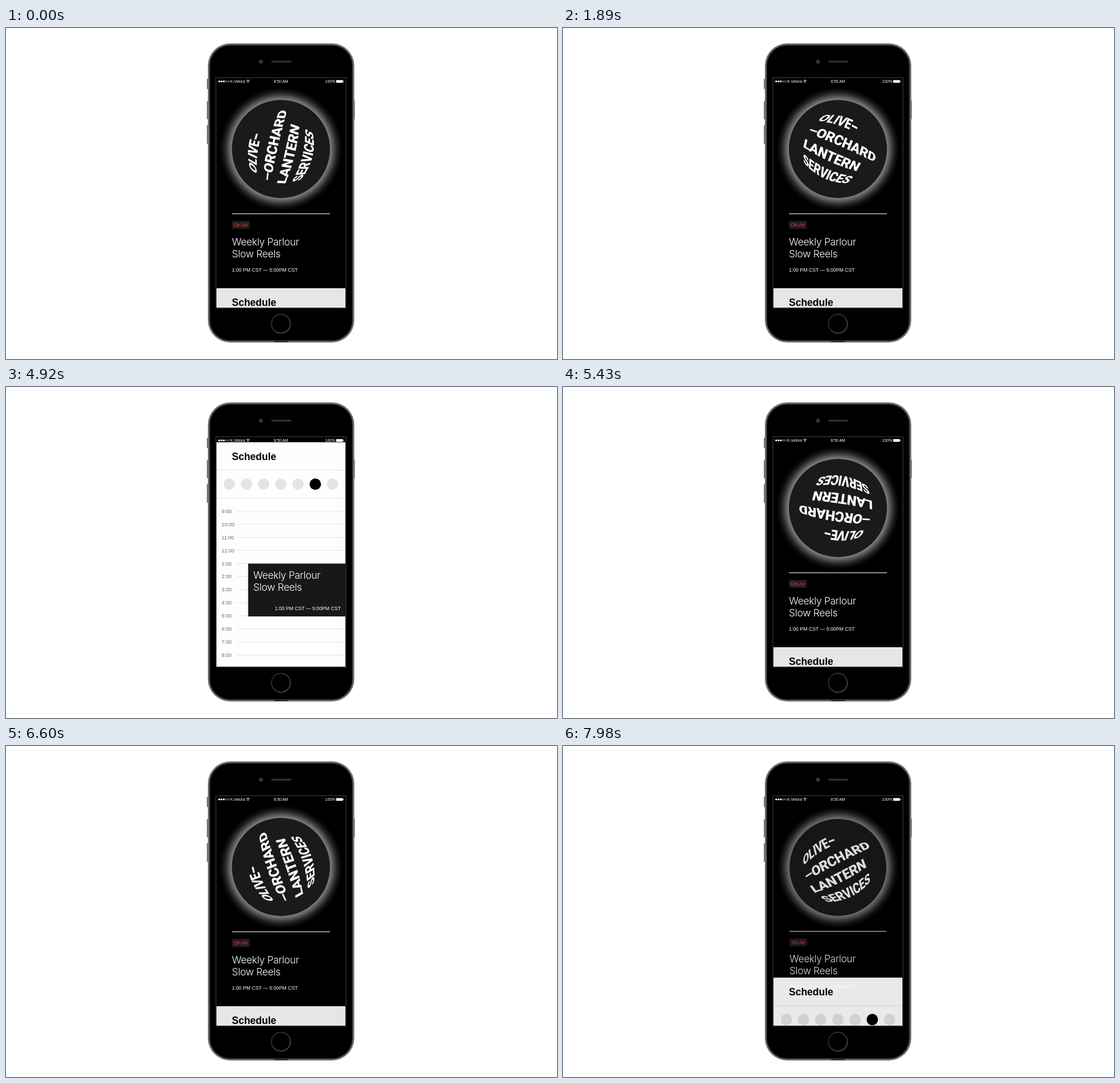
These frames come from a looping animation (966 px wide and 580 px high, 8 s). An HTML page:

```html
<!DOCTYPE html>
<html lang="en">
<head>
<meta charset="utf-8">
<title>Radio schedule on a phone</title>
<style>
  html, body { margin: 0; width: 100%; height: 100%; overflow: hidden; background: #fff; }
  svg { display: block; width: 100vw; height: 100vh; }
  text { font-family: "Liberation Sans", Arial, sans-serif; fill: #fff; }
  .status { font-size: 6.8px; }
  .title { font: 300 17.5px Inter, Roboto, sans-serif; letter-spacing: -.35px; }
  .when { font-size: 8.72px; }
  .air { font-size: 8.8px; fill: #ff412b; }
  .head { font-size: 17.5px; font-weight: bold; fill: #000; }
  .hour { font-size: 9px; fill: #6a6a6a; }
  .globe { font: 800 25px Roboto, "Liberation Sans", sans-serif; text-anchor: middle; }
</style>
</head>
<body>
<svg viewBox="0 0 966 580">
  <defs>
    <linearGradient id="ring" x1="0" x2="1" y1="0" y2="1">
      <stop offset="0" stop-color="#2a2a2a"/>
      <stop offset=".5" stop-color="#3c3c3c"/>
      <stop offset="1" stop-color="#555"/>
    </linearGradient>
    <radialGradient id="glow">
      <stop offset=".79" stop-color="#fff" stop-opacity=".52"/>
      <stop offset=".84" stop-color="#fff" stop-opacity=".37"/>
      <stop offset=".9" stop-color="#fff" stop-opacity=".17"/>
      <stop offset=".95" stop-color="#fff" stop-opacity=".06"/>
      <stop offset="1" stop-color="#fff" stop-opacity="0"/>
    </radialGradient>
    <clipPath id="glass"><rect x="369" y="88" width="226" height="402"/></clipPath>
  </defs>

  <!-- phone body -->
  <g fill="#7c7e85">
    <rect x="352" y="89" width="3" height="18" rx="1"/>
    <rect x="352" y="128" width="3" height="32" rx="1"/>
    <rect x="352" y="170" width="3" height="33" rx="1"/>
    <rect x="609" y="127" width="2.6" height="33" rx="1"/>
  </g>
  <rect x="354" y="27" width="256.5" height="524" rx="39" fill="#5c5f61"/>
  <rect x="355.5" y="28.5" width="253.5" height="521" rx="37.5" fill="none" stroke="#7b7e80"/>
  <rect x="357.5" y="30.5" width="249.5" height="517" rx="35.5" fill="#000" stroke="#1e1f20" stroke-width="1.6"/>
  <rect x="470" y="548.5" width="24" height="2" fill="#2a2b2d"/>
  <circle cx="447" cy="59" r="4" fill="#22242c"/>
  <circle cx="447" cy="59" r="2" fill="#3d4360"/>
  <rect x="465" y="57.6" width="35.5" height="3" rx="1.5" fill="#343436"/>
  <circle cx="482" cy="518.2" r="16.6" fill="#000" stroke="url(#ring)" stroke-width="1.6"/>
  <rect x="368" y="87" width="228" height="404" fill="#000" stroke="#232323" stroke-width="2"/>

  <g clip-path="url(#glass)">
    <g id="hero">
      <circle cx="482" cy="212" r="108" fill="url(#glow)"/>
      <circle cx="482" cy="212" r="86" fill="#1a1a1a"/>
      <g id="globe"></g>
      <rect x="396" y="324.8" width="172" height="1.4" fill="#c8c8c8"/>
      <rect x="396" y="338" width="31.5" height="14" rx="1.5" fill="#1e1e1e"/>
      <text class="air" x="399.5" y="348.2">On Air</text>
      <text class="title" x="396" y="380.8">Weekly Parlour</text>
      <text class="title" x="396" y="401.8">Slow Reels</text>
      <text class="when" x="396" y="427.2">1:00 PM CST — 5:00PM CST</text>
    </g>

    <g id="status">
      <text class="status" x="393" y="96.2">K-Velora</text>
      <text class="status" x="482" y="96.2" text-anchor="middle">8:50 AM</text>
      <text class="status" x="577" y="96.2" text-anchor="end">100%</text>
      <g fill="none" stroke="#fff" stroke-width="1">
        <path d="M421.2 92.4Q424.2 89.8 427.2 92.4M422.4 94.1Q424.2 92.5 426 94.1"/>
      </g>
      <circle cx="424.2" cy="95.6" r=".8" fill="#fff"/>
      <rect x="578.8" y="91.2" width="11.8" height="4.8" rx=".8" fill="#fff"/>
      <rect x="591" y="92.6" width="1" height="2" fill="#fff"/>
    </g>

    <g id="panel">
      <rect x="369" y="0" width="226" height="410" fill="#fff"/>
      <text class="head" x="396" y="30.8">Schedule</text>
      <rect x="369" y="48.3" width="226" height="1" fill="#e2e2e2"/>
      <rect x="369" y="97.6" width="226" height="1" fill="#e2e2e2"/>
      <g id="days"></g>
      <g id="hours"></g>
      <rect x="424.5" y="212.7" width="171" height="92.5" fill="#000" opacity=".9"/>
      <text class="title" x="433.5" y="239.3">Weekly Parlour</text>
      <text class="title" x="433.5" y="260.3">Slow Reels</text>
      <text class="when" x="587" y="294.7" text-anchor="end">1:00 PM CST — 5:00PM CST</text>
    </g>
  </g>
</svg>
<script>
  const $ = id => document.getElementById(id);

  function add(parent, tag, attrs, content) {
    const el = document.createElementNS('http://www.w3.org/2000/svg', tag);
    for (const key in attrs) el.setAttribute(key, attrs[key]);
    if (content) el.textContent = content;
    return parent.appendChild(el);
  }

  for (let i = 0; i < 5; i++) {
    add($('status'), 'circle', {
      cx: 373.8 + 4 * i, cy: 93.6, r: i < 3 ? 1.7 : 1.4,
      fill: i < 3 ? '#fff' : 'none', stroke: i < 3 ? 'none' : '#fff', 'stroke-width': .5
    });
  }

  for (let i = 0; i < 7; i++) {
    add($('days'), 'circle', { cx: 391.5 + 30.15 * i, cy: 73.5, r: 10, fill: i === 5 ? '#000' : '#e5e5e5' });
  }

  for (let i = 0; i < 13; i++) {
    const y = 121 + 22.9 * i;
    add($('hours'), 'rect', { x: 404.5, y: y - .4, width: 191, height: .9, fill: '#e0e0e0' });
    add($('hours'), 'text', { class: 'hour', x: 378, y: y + 3.2 }, (8 + i) % 12 + 1 + ':00');
  }

  // Each letter gets the local slope of a barrel bulge, so the rows wrap a ball.
  const BULGE_X = 8e-5, BULGE_Y = 5.6e-5;
  const rows = [['OLIVE–', -48], ['–ORCHARD', -15], ['LANTERN', 17], ['SERVICES', 48]];
  const pen = document.createElement('canvas').getContext('2d');
  pen.font = '800 25px Roboto, "Liberation Sans", sans-serif';

  for (const [word, y] of rows) {
    let left = -61;
    for (const letter of word) {
      const width = pen.measureText(letter).width;
      const x = left + width / 2;
      const sx = 1 - BULGE_X * y * y, sy = 1 - BULGE_Y * x * x;
      const m = [sx, -2 * BULGE_Y * x * y, -2 * BULGE_X * x * y, sy, x * sx, y * sy];
      add($('globe'), 'text', { class: 'globe', y: 8.9, transform: `matrix(${m.map(n => n.toFixed(4))})` }, letter);
      left += width - .4;
    }
  }

  const LOOP = 8000, STEP = 30, SLIDE = 182, TRAVEL = 368;

  function ease(x) {
    x = Math.min(1, Math.max(0, x));
    return x < .5 ? 4 * x ** 3 : 1 - 4 * (1 - x) ** 3;
  }

  // 0 = hero showing, 1 = schedule covers the screen
  function openness(t) {
    const moved = start => ease((t - start) / SLIDE);
    return moved(2248) - moved(4887) + moved(6748) - moved(7857);
  }

  // The globe loses a little time whenever it is covered.
  function spin(t) {
    const lag = t < 2440 ? 0 : t < 6940 ? 23.4 : 14.8;
    return -77.2 + .0532 * t - lag;
  }

  function draw(now) {
    const t = Math.floor(now % LOOP / STEP) * STEP;
    const p = openness(t);
    $('globe').setAttribute('transform', `translate(482 212) rotate(${spin(t)})`);
    $('hero').setAttribute('transform', `translate(482 272) scale(${1 - .09 * p}) translate(-482 -272)`);
    $('hero').setAttribute('opacity', 1 - p);
    $('panel').setAttribute('transform', `translate(0 ${456 - TRAVEL * p})`);
    $('panel').setAttribute('opacity', .9 + .1 * p);
  }

  const begin = performance.now();
  function tick() {
    draw(performance.now() - begin);
    requestAnimationFrame(tick);
  }
  tick();
</script>
</body>
</html>
```
